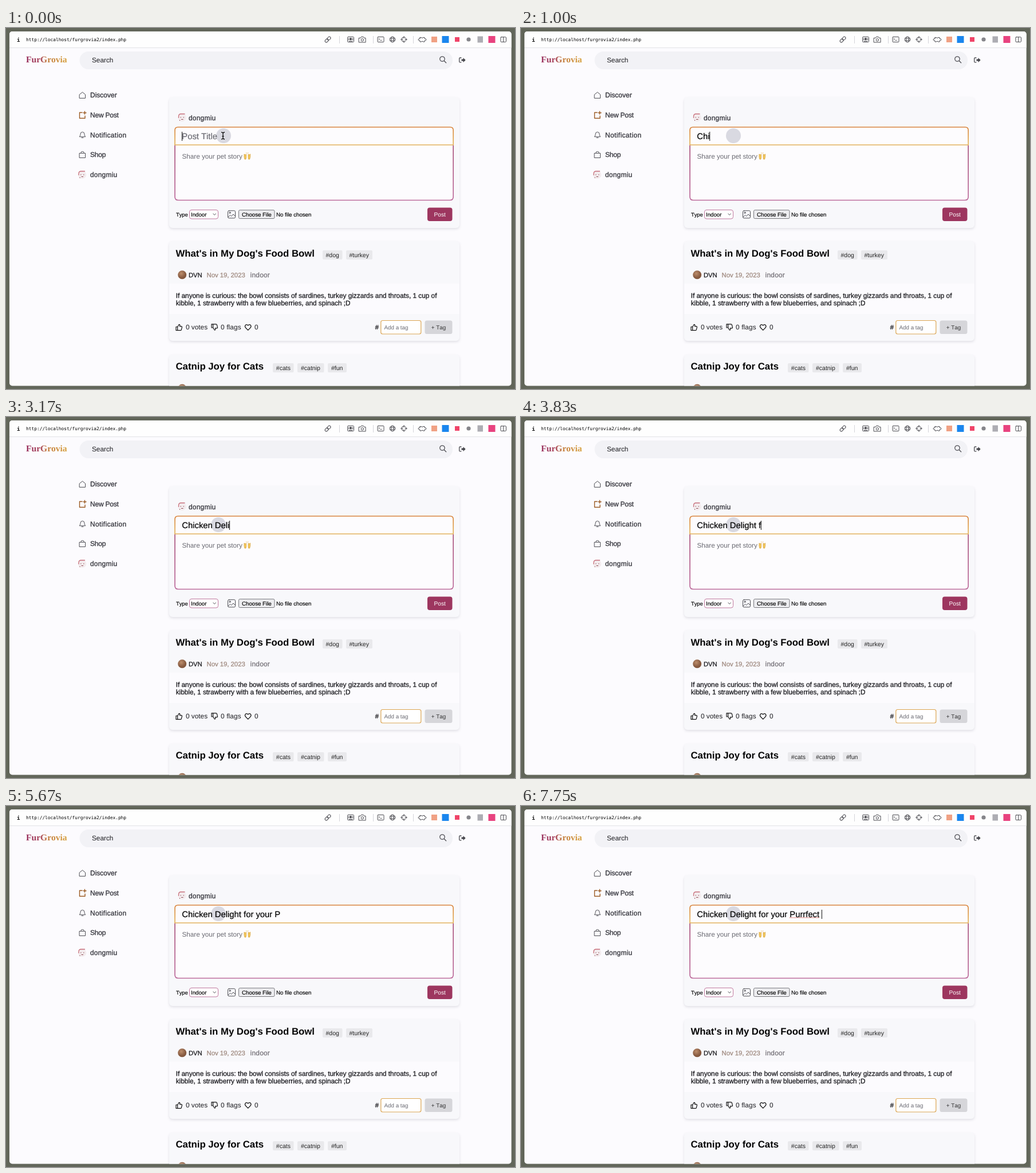
Animation, 889 px wide and 630 px high, one loop 8 s. Source, as an HTML page:

```html
<!DOCTYPE html>
<html lang="en">
<head>
<meta charset="utf-8">
<title>New post</title>
<style>
html, body { margin: 0; width: 100%; height: 100%; overflow: hidden; background: #62665a; }
svg { display: block; }
text {
  font: 11.8px "Liberation Sans", Arial, sans-serif;
  font-kerning: none; text-rendering: geometricPrecision; white-space: pre; fill: #1c1c20;
}
.med { stroke: currentColor; stroke-width: .3px; color: #1c1c20; }
.nav text { font-size: 12px; fill: #33333a; color: #33333a; }
.head { font-size: 16.75px; font-weight: bold; fill: #050505; }
.tag text { font-size: 10.5px; fill: #222; }
.tag rect { fill: #e9e9ec; }
.ctl { font-size: 9.7px; fill: #000; color: #000; stroke-width: .15px; }
.field { font-size: 14.8px; stroke: currentColor; stroke-width: .2px; fill: currentColor; }
.hint { fill: #6a6a72; }
.url { font: 7.86px "DejaVu Sans Mono", monospace; fill: #000; }
.brand { font: bold 15.6px "Liberation Serif", serif; fill: url(#brand); }
.line { fill: none; stroke: #4c4c52; stroke-width: 1; stroke-linecap: round; stroke-linejoin: round; }
.act { stroke: #111; stroke-width: 1.2; }
.card { fill: #f8f8fb; filter: drop-shadow(0 2px 2px rgba(40, 40, 60, .13)); }
</style>
</head>
<body>
<svg width="889" height="630" viewBox="0 0 889 630">
  <defs>
    <linearGradient id="brand" gradientUnits="userSpaceOnUse" x1="35" x2="107" y1="0" y2="0">
      <stop offset="0" stop-color="#98305e"/><stop offset=".35" stop-color="#a8425a"/>
      <stop offset=".5" stop-color="#c27a3c"/><stop offset="1" stop-color="#d8a342"/>
    </linearGradient>
    <linearGradient id="warm" x2="0" y2="1">
      <stop offset="0" stop-color="#d9853f"/><stop offset="1" stop-color="#e5b55a"/>
    </linearGradient>
    <linearGradient id="rose" x2="0" y2="1">
      <stop offset="0" stop-color="#a9527c"/><stop offset="1" stop-color="#bd6c9c"/>
    </linearGradient>
    <radialGradient id="fur" cx=".4" cy=".35">
      <stop offset="0" stop-color="#bd8d6b"/><stop offset="1" stop-color="#865a40"/>
    </radialGradient>
    <clipPath id="win"><rect x="6" y="6" width="876.7" height="618.5" rx="5"/></clipPath>
    <g id="face">
      <circle r="7.2" fill="#f3ecee"/>
      <path d="M-6 -2q0 -4 4 -4h7M-6 -2v3" fill="none" stroke="#c9717d" stroke-width="1.3"/>
      <path d="M-3 0h1.5M2 0h1.5M-1.5 3.5h3.5M-4 4.5v1.5" stroke="#8d4852"/>
    </g>
    <path id="thumb" class="line act" d="M-5 -1h2.6v6.2h-2.6zM-2.4 -.8l2.6 -4.4c1.8 0 1.9 1.2 1.2 3.4h3.4q.9 .3 .6 1.5l-1.1 4.4q-.3 1.1 -1.4 1.1h-5.3"/>
  </defs>

  <rect width="889" height="630" fill="#62665a"/>
  <g clip-path="url(#win)">
    <rect width="889" height="630" fill="#fcfbfe"/>

    <!-- toolbar -->
    <rect width="889" height="34" fill="#fefefe"/>
    <path d="M0 34.5H889" stroke="#e2e2e6"/>
    <text class="url" x="19" y="24" style="font-size:9px;font-weight:bold">i</text>
    <text class="url" x="35" y="23">http://localhost/furgrovia2/index.php</text>
    <path d="M582.5 14v13M641.5 14v13M711.5 14v13" stroke="#d4d4da"/>
    <g class="line">
      <g transform="rotate(-45 562 20)"><rect x="556" y="17.8" width="6.6" height="4.6" rx="2.3"/><rect x="561.4" y="17.8" width="6.6" height="4.6" rx="2.3"/></g>
      <rect x="596.5" y="15.5" width="11" height="9" rx="1"/><circle cx="602" cy="19.3" r="1.7" fill="#44444a"/><path d="M599 23h6M598.5 18v3M605.5 18v3"/>
      <path d="M616.5 17.5h2.6l1.2 -2h4l1.2 2h2.6v7.5h-11.6z"/><circle cx="622.3" cy="20.8" r="2.2"/>
      <rect x="649" y="15.5" width="11" height="9" rx="1"/><path d="M651 18l1.6 1.5l-1.6 1.5M654 21.5h2"/>
      <circle cx="675" cy="20" r="4.7"/><ellipse cx="675" cy="20" rx="2.2" ry="4.7"/><path d="M670.7 18h8.6M670.7 22h8.6"/>
      <circle cx="695" cy="20" r="4"/><path d="M695 14.5v3.5M695 22v3.5M689.5 20h3.5M697 20h3.5"/>
      <path d="M723 16.5h2q2 2 4 0h2v2q3 0 3 1.8t-3 1.8v2h-2q-2 -2 -4 0h-2v-2q-3 0 -3 -1.8t3 -1.8z"/>
      <rect x="864" y="15.8" width="9.5" height="8.6" rx="1"/><path d="M868.7 16v8"/>
    </g>
    <rect x="743" y="15" width="10" height="10" fill="#f0a184"/>
    <rect x="761.5" y="14" width="12" height="12" fill="#1a86ee"/>
    <rect x="784" y="16" width="8" height="8" fill="#f04468"/>
    <circle cx="808" cy="20" r="3.6" fill="#85858a"/>
    <rect x="823.5" y="14.5" width="9.5" height="11" fill="#adadb3"/>
    <rect x="842.5" y="14" width="12" height="12" fill="#e8437f"/>

    <!-- header -->
    <text class="brand" x="35" y="60">FurGrovia</text>
    <rect x="128.5" y="41" width="651.5" height="31" rx="15.5" fill="#f2f2f6"/>
    <text x="150" y="60.3" fill="#444">Search</text>
    <g class="line" style="stroke-width:1.3">
      <circle cx="762" cy="54" r="4.2"/><path d="M765.2 57.2l3.5 3.5"/>
      <path d="M795 52h-2q-1.3 0 -1.3 1.3v5.2q0 1.3 1.3 1.3h2"/>
    </g>
    <path d="M795.5 54.5h3v-2.5l4.2 4l-4.2 4v-2.5h-3z" fill="#44444a"/>

    <!-- side menu -->
    <g class="nav med">
      <text x="147" y="121.3">Discover</text>
      <text x="147" y="156" letter-spacing="-.2">New Post</text>
      <text x="147" y="190.7" letter-spacing=".35">Notification</text>
      <text x="147" y="225.3" letter-spacing="-.2">Shop</text>
      <text x="147" y="260" letter-spacing=".2">dongmiu</text>
    </g>
    <g class="line">
      <path d="M128.5 116l5 -4l5 4v6.5h-10z"/>
      <path d="M133 147.5h-4.5v10h9.5v-4M137.5 145.5v5M135 148h5" style="stroke:#9a5a22;stroke-width:1.4"/>
      <path d="M128.5 189.5q1.5 -1.5 1.5 -4q0 -4 3.5 -4t3.5 4q0 2.5 1.5 4zM132 191.5h3"/>
      <path d="M128.5 218.5h10v8h-10zM131 218.5v-1q0 -2 2.5 -2t2.5 2v1"/>
    </g>
    <use href="#face" x="133" y="256"/>

    <!-- editor card -->
    <rect class="card" x="285" y="121" width="507" height="228" rx="6"/>
    <use href="#face" x="307.5" y="156"/>
    <g class="nav med"><text x="319" y="160.5" letter-spacing=".2">dongmiu</text></g>
    <path d="M295 204.5v90q0 6 6 6h474.200q6 0 6 -6v-90" fill="#fdfcfe" stroke="url(#rose)" stroke-width="1.7"/>
    <path d="M295 204v-25.500q0 -5.500 5.500 -5.500h475.200q5.500 0 5.500 5.500v25.500" fill="#fdfcfe" stroke="url(#warm)" stroke-width="1.7"/>
    <path d="M294 204h488" stroke="#e3b25c" stroke-width="1.4"/>

    <circle id="pointer" r="13" fill="#d9d9e1"/>
    <text id="title" class="field" x="307.3" y="194"></text>
    <path id="typo" fill="none" stroke="#d2473f" stroke-width="1.3" stroke-dasharray="1.3 1.3"/>
    <rect id="caret" y="181" width="1" height="16" fill="#111"/>
    <path id="beam" d="M-3 -6q3 0 3 2q0 -2 3 -2M0 -4v8M-3 6q3 0 3 -2q0 2 3 2M-1.5 1h3" fill="none" stroke="#111" stroke-width="1.3"/>

    <text class="hint" x="307.5" y="228" style="font-size:11.7px">Share your pet story</text>
    <g fill="#f3cb62" stroke="#d9a035" stroke-width=".8">
      <path d="M416 220l2 1.500l1.500 -1.500v6l-.6 3h-2l-1 -4.500z"/>
      <path d="M426.500 220l-2 1.500l-1.500 -1.500v6l.6 3h2l1 -4.500z"/>
      <path d="M419.700 217.500l.5 1.500M422.800 217.500l-.5 1.500"/>
    </g>

    <text class="ctl med" x="297" y="328.5" style="font-size:9.3px">Type</text>
    <rect x="320.5" y="317.5" width="50" height="15.5" rx="3.5" fill="#fff" stroke="#c0789f"/>
    <text class="ctl med" x="323" y="328.5">Indoor</text>
    <path class="line" d="M361.8 324l2.4 2.4l2.4 -2.4"/>
    <g class="line"><rect x="387.5" y="318.8" width="13" height="13" rx="2"/><circle cx="391" cy="322.3" r="1.2"/><path d="M388 330l3.5 -3.5l2 2l3.5 -3.5l3.3 3.5"/></g>
    <rect x="406.5" y="317.8" width="62.5" height="14.7" rx="2" fill="#ededf0" stroke="#77777c"/>
    <text class="ctl med" x="412" y="328.5">Choose File</text>
    <text class="ctl med" x="472" y="328.5">No file chosen</text>
    <rect x="736" y="313.5" width="43.5" height="23.5" rx="4" fill="#9d365f"/>
    <text x="747.5" y="329" style="font-size:10.2px;fill:#fff">Post</text>

    <!-- first post -->
    <rect class="card" x="285" y="372" width="507" height="174" rx="6"/>
    <rect x="285" y="446" width="507" height="53" fill="#fcfbfe"/>
    <text class="head" x="296.5" y="399">What's in My Dog's Food Bowl</text>
    <g class="tag">
      <rect x="553" y="388" width="34.5" height="16" rx="2"/><text x="558.5" y="399.5">#dog</text>
      <rect x="594" y="388" width="46" height="16" rx="2"/><text x="599.5" y="399.5">#turkey</text>
    </g>
    <circle cx="307.7" cy="430.7" r="7.5" fill="url(#fur)"/>
    <text class="med" x="319" y="435" style="font-size:11.2px">DVN</text>
    <text class="med" x="350.5" y="435" style="font-size:11.3px;fill:#a08b80;color:#a08b80">Nov 19, 2023</text>
    <text class="med" x="426.5" y="435" letter-spacing=".3" style="fill:#77747a;color:#77747a">indoor</text>
    <g class="med">
      <text x="296.7" y="471">If anyone is curious: the bowl consists of sardines, turkey gizzards and throats, 1 cup of</text>
      <text x="296.7" y="484">kibble, 1 strawberry with a few blueberries, and spinach ;D</text>
    </g>
    <use href="#thumb" x="302" y="522.5"/>
    <use href="#thumb" transform="translate(364 522) scale(1 -1)"/>
    <path class="line act" d="M422.7 527.3l-4.3 -4.3q-2 -2.6 0 -4.7q2.2 -1.8 4.3 .7q2.1 -2.5 4.3 -.7q2 2.1 0 4.7z"/>
    <text x="314" y="526.3">0 votes</text>
    <text x="375" y="526.3" letter-spacing=".15">0 flags</text>
    <text x="434" y="526.3">0</text>
    <text class="med" x="644.8" y="526" style="font-size:11px">#</text>
    <rect x="654.8" y="510.5" width="70" height="23.5" rx="3" fill="#fff" stroke="#dca552" stroke-width="1.2"/>
    <text class="hint" x="660.5" y="525.7" style="font-size:9.8px">Add a tag</text>
    <rect x="731.5" y="510.5" width="48" height="23.5" rx="3.5" fill="#d6d6da"/>
    <text x="742.7" y="525.7" style="font-size:9.9px;fill:#333">+ Tag</text>

    <!-- second post -->
    <rect class="card" x="285" y="570" width="507" height="80" rx="6"/>
    <text class="head" x="296.5" y="596.3">Catnip Joy for Cats</text>
    <g class="tag">
      <rect x="466" y="585" width="36.5" height="16" rx="2"/><text x="471.8" y="596.7">#cats</text>
      <rect x="509" y="585" width="46.5" height="16" rx="2"/><text x="515" y="596.7">#catnip</text>
      <rect x="562" y="585" width="33" height="16" rx="2"/><text x="568" y="596.7">#fun</text>
    </g>
    <circle cx="307.7" cy="629" r="7.5" fill="url(#fur)"/>
  </g>
</svg>
<script>
const LOOP = 8000, LEFT = 307.3;
const phrase = 'Chicken Delight for your Purrfect ';

// [time in ms, value]
const typed = [[0, 0], [580, 1], [920, 2], [1000, 3], [1420, 4], [1580, 6], [1920, 7],
  [2080, 8], [2420, 9], [2750, 10], [3080, 11], [3170, 12], [3500, 13], [3580, 14],
  [3670, 16], [3830, 17], [4080, 18], [4170, 19], [4250, 20], [4330, 21], [4420, 22],
  [4580, 23], [4830, 25], [5170, 26], [5830, 27], [6080, 28], [6330, 29], [6920, 30],
  [7000, 31], [7420, 32], [7670, 33], [7750, 34]];
const pointerX = [[0, 380], [80, 375], [170, 371]];
const caretOn = [[0, 1], [170, 0], [580, 1], [5670, 0], [5830, 1]];

const el = id => document.getElementById(id);
const [title, caret, pointer, beam, typo] = ['title', 'caret', 'pointer', 'beam', 'typo'].map(el);
const show = (node, on) => node.setAttribute('visibility', on ? 'visible' : 'hidden');
const at = (steps, t) => steps.findLast(s => s[0] <= t)[1];

const pen = document.createElement('canvas').getContext('2d');
pen.font = '14.8px "Liberation Sans", Arial, sans-serif';
pen.fontKerning = 'none';
pen.textRendering = 'geometricPrecision';
const edge = n => LEFT + pen.measureText(phrase.slice(0, n)).width;

typo.setAttribute('d', `M${edge(25)} 194.9H${edge(33)}`);

function draw(t) {
  const n = at(typed, t), x = at(pointerX, t);
  title.textContent = n ? phrase.slice(0, n) : 'Post Title';
  title.style.color = n ? '#000' : '#6a6a72';
  caret.setAttribute('x', edge(n) - .3);
  show(caret, at(caretOn, t));
  pointer.setAttribute('transform', `translate(${x} 188)`);
  beam.setAttribute('transform', `translate(${x - 1} 188)`);
  show(beam, n === 0);
  show(typo, n === phrase.length);
}

const start = performance.now();
function tick() {
  draw((performance.now() - start) % LOOP);
  requestAnimationFrame(tick);
}
tick();
</script>
</body>
</html>
```
